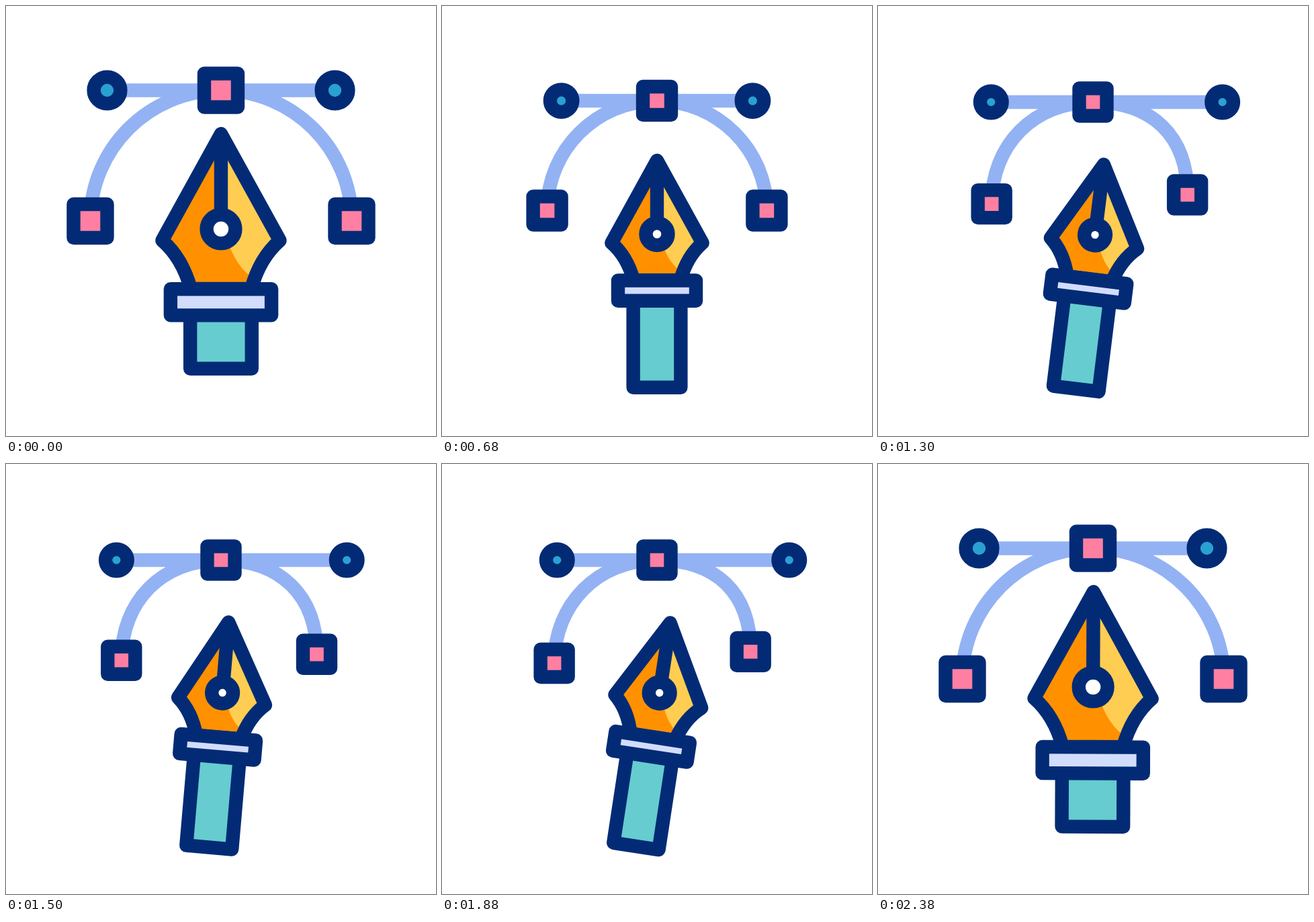
These frames come from a looping animation (640x640 px, 2.4 s). An HTML page with a canvas:

```html
<!DOCTYPE html>
<html lang="en">
<head>
<meta charset="utf-8">
<title>Pen tool</title>
<style>
  html, body { margin: 0; width: 100%; height: 100%; overflow: hidden; background: #fff; }
  canvas { display: block; width: 100vmin; height: 100vmin; }
</style>
</head>
<body>
<canvas id="stage" width="640" height="640"></canvas>
<script>
const ctx = document.getElementById('stage').getContext('2d');
const LOOP = 2400;
const STROKE = 20.4;
const NAVY = '#032b75', LINE = '#93b2f4', PINK = '#ff7fa2', BLUE = '#2aa1d3';
const ORANGE = '#ff9100', YELLOW = '#ffcd52', TEAL = '#66ccd0', LILAC = '#d2dcfd';

// Smooth interpolation through [time, value] keys.
function track(keys, t) {
  if (t <= keys[0][0]) return keys[0][1];
  for (let i = 1; i < keys.length; i++) {
    const [t0, a] = keys[i - 1], [t1, b] = keys[i];
    if (t < t1) {
      const p = (t - t0) / (t1 - t0);
      return a + (b - a) * p * p * (3 - 2 * p);
    }
  }
  return keys[keys.length - 1][1];
}

const SHRINK = [[200, 0], [807, 1], [1970, 1], [2370, 0]];
const SWING = [[787, 0], [1110, -14], [1393, 14], [1677, -14], [1960, 14], [2415, 0]];
const LEFT = [[787, 0], [1110, 1], [1393, 0], [1677, 1], [1960, 0]];
const RIGHT = [[1110, 0], [1393, 1], [1677, 0], [1960, 1], [2367, 0]];

function paint(path, fill) {
  if (fill) {
    ctx.fillStyle = fill;
    ctx.fill(path);
  }
  ctx.strokeStyle = NAVY;
  ctx.stroke(path);
}

function box(x, y, w, h, fill) {
  const p = new Path2D();
  p.rect(x, y, w, h);
  paint(p, fill);
}

function disc(x, y, r, fill) {
  const p = new Path2D();
  p.arc(x, y, r, 0, Math.PI * 2);
  paint(p, fill);
}

function drawCurve(shrink, left, right) {
  const s = 1 - 0.18 * shrink;
  const X = x => 320 + x * s;
  const Y = y => 222.7 + (y - 97.2) * s;
  const bend = 107.4;
  const sides = [
    { knob: -169.5 - 62.5 * left, x: -194.5 + 42.5 * left, y: 194.5 - 38.8 * left, dir: -1 },
    { knob: 169.5 + 87 * right, x: 194.5 - 30.6 * right, y: 194.5 - 34.8 * right, dir: 1 }
  ];

  ctx.strokeStyle = LINE;
  ctx.beginPath();
  for (const e of sides) {
    ctx.moveTo(X(0), Y(0));
    ctx.lineTo(X(e.knob), Y(0));
    ctx.moveTo(X(0), Y(0));
    ctx.bezierCurveTo(X(e.dir * bend), Y(0), X(e.x), Y(e.y - bend), X(e.x), Y(e.y));
  }
  ctx.stroke();

  const half = 25 * s;
  const anchor = (x, y) => box(X(x) - half, Y(y) - half, 2 * half, 2 * half, PINK);
  for (const e of sides) {
    disc(X(e.knob), Y(0), 19.9 * s, BLUE);
    anchor(e.x, e.y);
  }
  anchor(0, 0);
}

function drawPen(shrink, angle) {
  const k = 1 - 0.256 * shrink;
  const end = 174.8 + 31.5 * shrink;
  ctx.save();
  ctx.translate(320, 365);
  ctx.rotate(angle * Math.PI / 180);

  box(-45.8 * k, 90 * k, 91.6 * k, end - 90 * k, TEAL);

  const nib = new Path2D();
  nib.moveTo(0, -174.8 * k);
  nib.lineTo(87.6 * k, -16 * k);
  nib.quadraticCurveTo(57.6 * k, 10 * k, 45 * k, 56 * k);
  nib.lineTo(-45 * k, 56 * k);
  nib.quadraticCurveTo(-57.6 * k, 10 * k, -87.6 * k, -16 * k);
  nib.closePath();
  ctx.fillStyle = ORANGE;
  ctx.fill(nib);

  ctx.save();
  ctx.clip(nib);
  ctx.fillStyle = YELLOW;
  ctx.beginPath();
  ctx.moveTo(0, -174.8 * k);
  ctx.lineTo(95 * k, -16 * k);
  ctx.lineTo(50 * k, 41 * k);
  ctx.quadraticCurveTo(23 * k, 26 * k, 8 * k, -20 * k);
  ctx.lineTo(0, -33 * k);
  ctx.fill();
  ctx.restore();

  paint(nib);
  const slit = new Path2D();
  slit.moveTo(0, -174.8 * k);
  slit.lineTo(0, -50 * k);
  paint(slit);
  disc(0, -33 * k, 21.4 * k, '#fff');
  box(-75.1 * k, 56.3 * k, 150.2 * k, 39.1 * k, LILAC);
  ctx.restore();
}

function frame(now) {
  const t = now % LOOP;
  const shrink = track(SHRINK, t);
  ctx.fillStyle = '#fff';
  ctx.fillRect(0, 0, 640, 640);
  ctx.lineWidth = STROKE;
  ctx.lineJoin = 'round';
  drawCurve(shrink, track(LEFT, t), track(RIGHT, t));
  drawPen(shrink, t < 200 ? 0 : track(SWING, t));
}

const start = performance.now();
function tick() {
  frame(performance.now() - start);
  requestAnimationFrame(tick);
}
tick();
</script>
</body>
</html>
```
